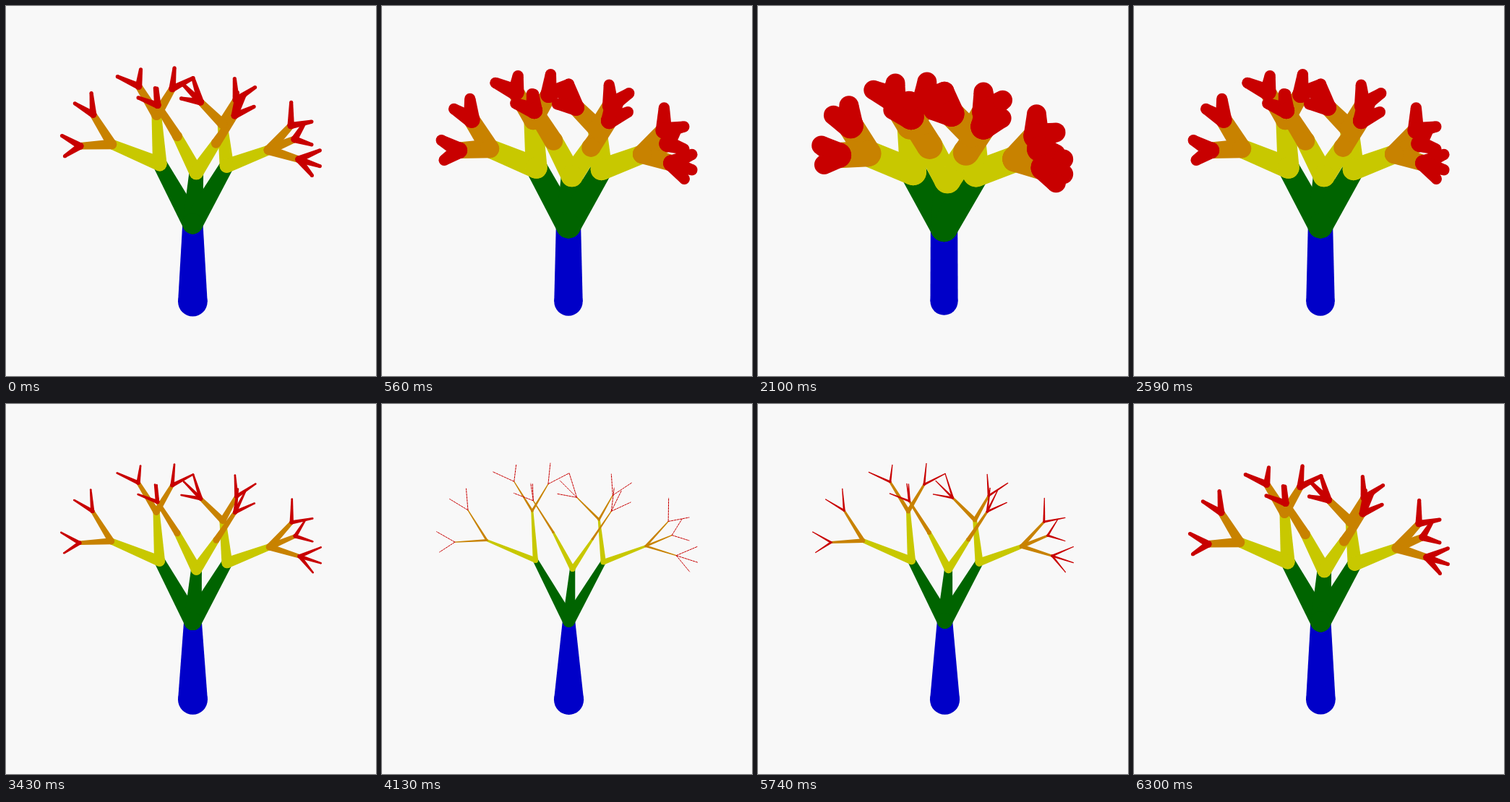
An HTML page with a canvas that plays this animation: 512x512 px, repeating every 6370 ms.

```html
<!DOCTYPE html>
<html lang="en">
<head>
<meta charset="utf-8">
<title>Branching tree</title>
<style>
  html, body { margin: 0; width: 100%; height: 100%; overflow: hidden; background: #f8f8f8; }
  canvas { display: block; width: 512px; height: 512px; }
</style>
</head>
<body>
<canvas id="stage" width="512" height="512"></canvas>
<script>
const ctx = document.getElementById('stage').getContext('2d');
const COLORS = ['#0000c8', '#006400', '#c8c800', '#c88200', '#c80000'];
const STEP = 70, STEPS = 91;
const ROOT = { x: 258.5, y: 409.3, r: 20.5 };

// Each node: [x, y, ...children]
const TREE = [258.5, 300.5,
  [212.5, 217,
    [145.5, 189.5,
      [119.5, 148, [94, 132.5], [117, 118]],
      [101.5, 192, [76, 177.5], [80, 206]]],
    [208, 149,
      [183, 108.5, [153.5, 95], [186, 85]],
      [230, 112, [233, 83], [259, 97]]]],
  [263.5, 229,
    [237, 178.5,
      [209.5, 135, [182.5, 124.5], [206, 111], [208.5, 111.5]]],
    [291, 188,
      [317, 149.5, [344, 137], [331, 121], [321, 117]]]],
  [306, 219.5,
    [300, 161,
      [269.5, 130.5, [259, 97], [246, 107], [242.5, 125.5]],
      [319, 127.5, [317, 98], [345.5, 110]]],
    [364.5, 197.5,
      [395.5, 163.5, [396, 131], [424.5, 158]],
      [400.5, 182.5, [414.5, 160], [424.5, 190]],
      [406.5, 210.5, [436, 198], [436, 220], [425, 233]]]]];

// Flatten into segments grouped by level, so children paint over parents
const levels = COLORS.map(() => []);
(function collect(from, [x, y, ...kids], depth) {
  const to = { x, y };
  levels[depth].push([from, to]);
  kids.forEach(kid => collect(to, kid, depth + 1));
})(ROOT, TREE, 0);

function disc(p, r) {
  ctx.beginPath();
  ctx.arc(p.x, p.y, r, 0, Math.PI * 2);
  ctx.fill();
}

function hairline(a, b, width) {
  ctx.setLineDash([4 * width, 4 * (1 - width)]);
  ctx.beginPath();
  ctx.moveTo(a.x, a.y);
  ctx.lineTo(b.x, b.y);
  ctx.stroke();
}

function limb(a, b, ra, rb) {
  if (ra + rb < 0.9) return hairline(a, b, ra + rb);
  const len = Math.hypot(b.x - a.x, b.y - a.y);
  const nx = (a.y - b.y) / len, ny = (b.x - a.x) / len;
  ctx.beginPath();
  ctx.moveTo(a.x + nx * ra, a.y + ny * ra);
  ctx.lineTo(b.x + nx * rb, b.y + ny * rb);
  ctx.lineTo(b.x - nx * rb, b.y - ny * rb);
  ctx.lineTo(a.x - nx * ra, a.y - ny * ra);
  ctx.fill();
  disc(a, ra);
  disc(b, rb);
}

function draw(step) {
  const taper = 0.695 + 0.33 * Math.sin(2 * Math.PI * step / (STEPS - 1));
  const radius = i => ROOT.r * taper ** i * (i === COLORS.length ? 0.78 : 1);
  // Zoom so that the crown always spans the same width
  const zoom = 362 / (360 + 2 * radius(COLORS.length));
  const place = p => ({
    x: ROOT.x - 14 * (1 - zoom) + zoom * (p.x - ROOT.x),
    y: ROOT.y - 8 * (1 - zoom) + zoom * (p.y - ROOT.y)
  });

  ctx.fillStyle = '#f8f8f8';
  ctx.fillRect(0, 0, 512, 512);
  levels.forEach((limbs, i) => {
    ctx.fillStyle = ctx.strokeStyle = COLORS[i];
    for (const [a, b] of limbs) {
      limb(place(a), place(b), zoom * radius(i), zoom * radius(i + 1));
    }
  });
}

const start = performance.now();
function tick() {
  draw(Math.floor((performance.now() - start) / STEP) % STEPS);
  requestAnimationFrame(tick);
}
tick();
</script>
</body>
</html>
```
